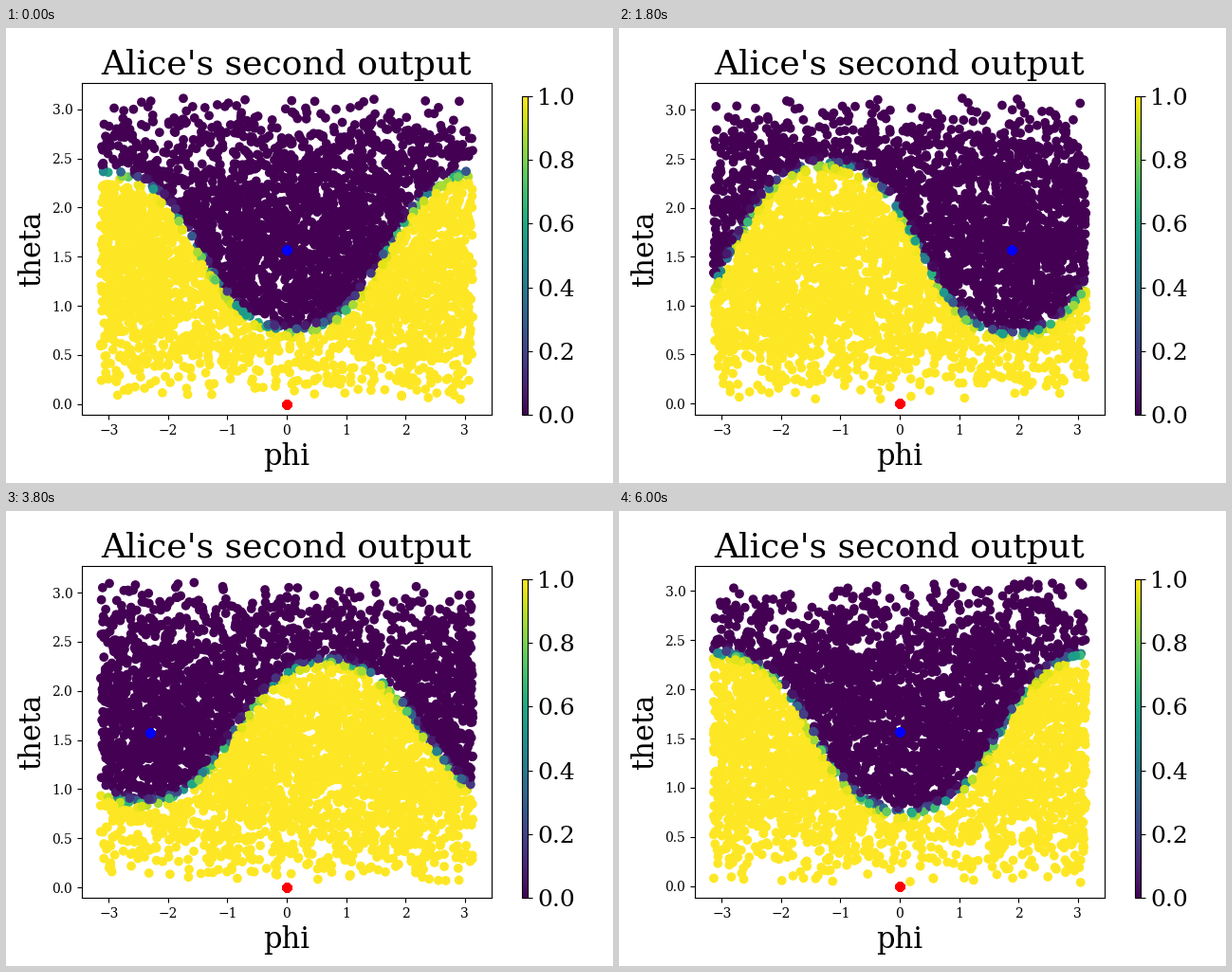
A matplotlib script that plays this animation: 640x480 px, repeating every 6.2 s.

```python
import numpy as np
import matplotlib.pyplot as plt
from matplotlib.animation import FuncAnimation
from matplotlib.cm import ScalarMappable

FRAMES, STEP_MS = 31, 200
N = 4000        # directions sampled on the sphere per frame
WIDTH = 0.016   # softness of the decision boundary, rad

plt.rcParams["font.family"] = "DejaVu Serif"
fig = plt.figure(figsize=(6.4, 4.8), dpi=100)
ax = fig.add_axes([0.125, 0.15, 0.675, 0.73])
cax = fig.add_axes([0.85, 0.15, 0.01, 0.7])

ax.set_title("Alice's second output", fontsize=26)
ax.set_xlabel("phi", fontsize=22)
ax.set_ylabel("theta", fontsize=22)
ax.set_xlim(-1.1 * np.pi, 1.1 * np.pi)

bar = fig.colorbar(ScalarMappable(plt.Normalize(0, 1), "viridis"), cax=cax)
bar.ax.tick_params(labelsize=18)


def stacked(phi, theta):
    """Many copies of one point, so its rim becomes solid."""
    return np.tile([phi, theta], (300, 1))


dots = ax.scatter(np.zeros(N), np.zeros(N), c=np.zeros(N),
                  cmap="viridis", vmin=0, vmax=1)
blue = ax.scatter(*stacked(0, np.pi / 2).T, color="blue")
red = ax.scatter(*stacked(0, 0).T, color="red")


def output(phi, theta, turn):
    """Soft step from 0 inside a spherical cap to 1 outside it."""
    # The cap follows the blue dot and wobbles a little on the way round
    w = turn - 4.75
    low = 0.785 + 0.115 * np.cos(w) + 0.04 * np.cos(2 * w)
    high = 2.365 + 0.14 * np.sin(turn + 0.6 * np.sin(turn))
    center = turn + 0.13 * np.cos(turn - 0.5) - 0.01

    far = 2 * np.pi - high
    tilt, radius = (far + low) / 2, (far - low) / 2
    cos_d = (np.sin(theta) * np.sin(tilt) * np.cos(phi - center)
             + np.cos(theta) * np.cos(tilt))
    dist = np.arccos(np.clip(cos_d, -1, 1)) - radius
    return 0.5 + 0.5 * np.tanh(dist / (2 * WIDTH))


def update(k):
    rng = np.random.default_rng(100 + k)
    turn = 2 * np.pi * k / (FRAMES - 1)

    # Uniform on the sphere, with a slightly varying gap at both poles
    lo, hi = rng.uniform(0.025, 0.05), rng.uniform(3.1, 3.13)
    phi = rng.uniform(-np.pi, np.pi, N)
    theta = np.arccos(rng.uniform(np.cos(hi), np.cos(lo), N))
    dots.set_offsets(np.column_stack([phi, theta]))
    dots.set_array(output(phi, theta, turn))

    angle = (turn + np.pi) % (2 * np.pi) - np.pi
    blue.set_offsets(stacked(angle, np.pi / 2))
    pad = 0.05 * (hi - lo)
    ax.set_ylim(lo - pad, hi + pad)
    return dots, blue, red


anim = FuncAnimation(fig, update, frames=FRAMES, interval=STEP_MS,
                     init_func=lambda: update(0), repeat=True, repeat_delay=0)
plt.show()
```
